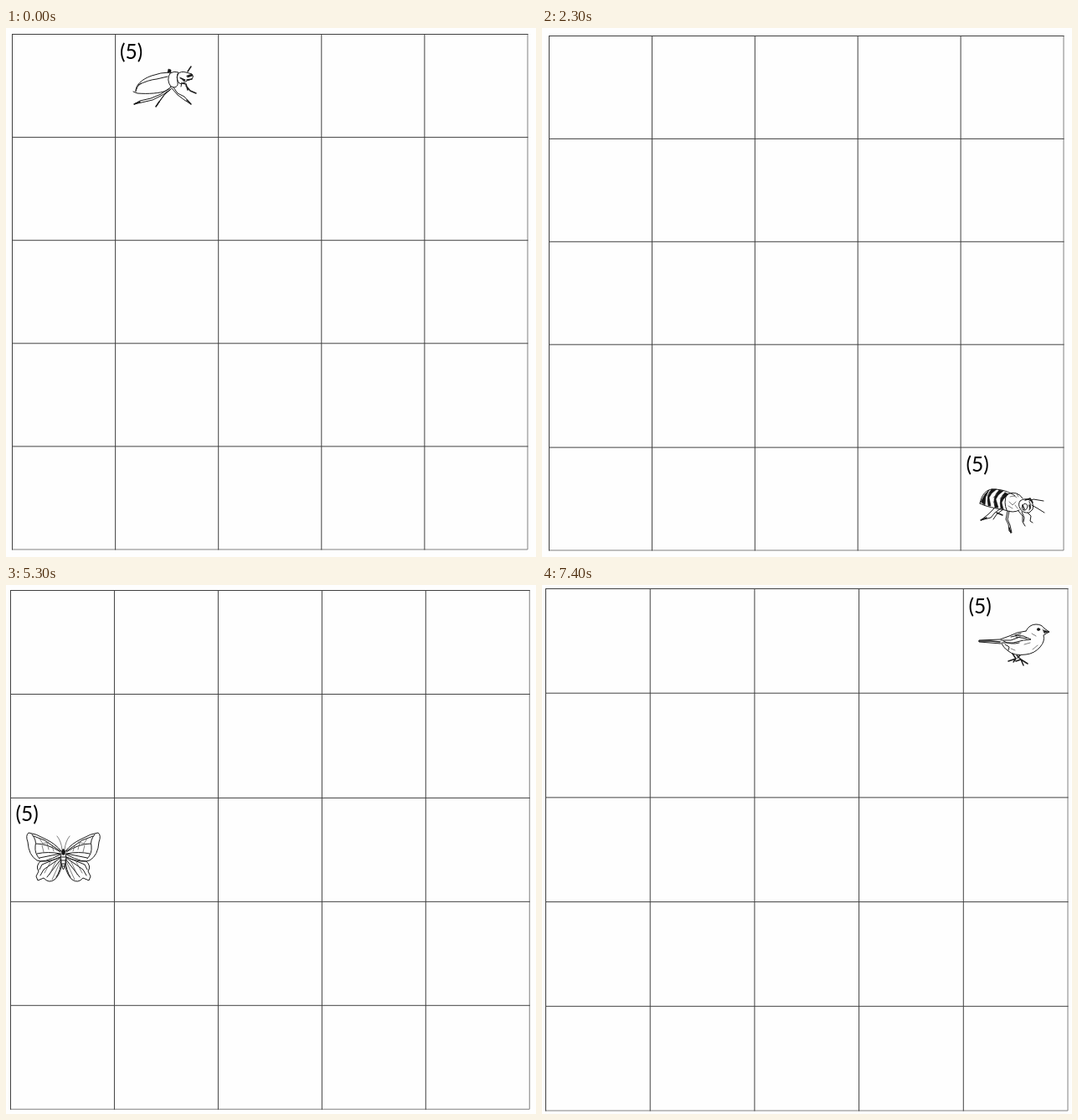
Write an HTML page that moves like this. It is 633 by 632 pixels and loops after 8 s.

```html
<!DOCTYPE html>
<html lang="en">
<head>
<meta charset="utf-8">
<title>Grid animals</title>
<style>
  html, body { margin: 0; width: 100%; height: 100%; overflow: hidden; background: #fefefe; }
  svg { display: block; width: 100vw; height: 100vh; }
  path, ellipse { fill: none; stroke: #1c1c1c; stroke-width: 1; stroke-linecap: round; stroke-linejoin: round; }
  text { font: 24.5px Lato, "Open Sans", sans-serif; fill: #000; }
  .grid { stroke: #404040; stroke-linecap: square; }
  .edge { stroke: #808080; stroke-linecap: square; }
  .thin { stroke: #555; stroke-width: .75; }
  .bold { stroke-width: 1.5; }
  .ink { fill: #151515; stroke-width: .6; }
  .scene { visibility: hidden; animation: 8s step-end infinite; }
  #beetle { animation-name: beetle; }
  #bee { animation-name: bee; }
  #butterfly { animation-name: butterfly; }
  #bird { animation-name: bird; }
  @keyframes beetle { 0% { visibility: visible } 6.25%, 100% { visibility: hidden } }
  @keyframes bee { 0% { visibility: hidden } 6.25% { visibility: visible } 43.75%, 100% { visibility: hidden } }
  @keyframes butterfly { 0% { visibility: hidden } 43.75% { visibility: visible } 81.25%, 100% { visibility: hidden } }
  @keyframes bird { 0% { visibility: hidden } 81.25%, 100% { visibility: visible } }
</style>
</head>
<body>
<svg viewBox="0 0 633 632" preserveAspectRatio="none">
  <g class="scene" id="beetle" data-grid="7.5 7.5 123.1">
    <text x="136" y="37">(5)</text>
    <path d="M155 76C154 69 162 61 174 57Q185 53 195 53M152 76L157 78C170 79 184 78 191 75Q196 73 197 70M158 68Q170 62 180 61L193 58M155 75Q156 70 161 66"/>
    <path d="M196 54Q201 51 206 53Q203 58 205 65Q206 70 201 71L197 70Q191 62 196 54M205 55Q209 51 215 53L222 55Q225 58 222 61L216 63Q211 68 207 66Q203 62 205 55M208 60L214 62"/>
    <path class="ink" d="M193 53L194 49L197 50L197 53ZM216 57L222 55L223 57L217 59ZM208 59L214 62L213 64Z"/>
    <path class="bold" d="M217 52L221 46M211 66L215 67L217 74M215 69L220 75L227 78M216 62L222 61"/>
    <path d="M195 72L185 79L173 84L160 87L153 91L162 89L175 86L187 80L197 73M197 73L189 80L184 87L179 94L185 85L192 76M200 71L205 78L213 82L221 91L213 86L205 80L198 72M210 65L209 70"/>
    <path class="bold" d="M153 91L160 88M179 94L183 88M216 86L221 91"/>
  </g>

  <g class="scene" id="bee" data-grid="8.5 9.5 122.9">
    <text x="506.5" y="530">(5)</text>
    <path d="M523 568C525 558 530 551 539 551C549 551 558 554 565 559M523 568C530 572 543 574 553 576Q563 580 570 576M555 557Q551 567 555 576M555 557Q568 552 574 562"/>
    <path class="ink" d="M524 566L529 557L534 552L530 560L529 570ZM537 551L543 551L537 556L534 561L536 571L533 571Q530 558 537 551ZM546 552L551 553L545 558L542 563L545 573L541 573Q537 560 546 552ZM553 555L557 557L551 563L549 567L551 575L548 574Q545 561 553 555Z"/>
    <path class="thin" d="M531 559L535 556M539 561L543 557M547 562L551 559M539 566L541 568M559 560Q564 558 567 561M558 566L562 570L566 566M557 571L562 574M565 570L568 574M567 557L569 560"/>
    <path d="M571 565Q576 561 583 564Q588 569 586 575L582 579Q574 580 571 574Q568 569 571 565M574 570Q578 566 580 571Q579 577 575 576Q572 574 574 570M582 566Q585 570 582 576"/>
    <path class="bold" d="M577 564L583 562L586 567M574 570L576 575M582 570L583 574"/>
    <path d="M582 565L587 563L599 565M585 570L592 574L600 579"/>
    <path d="M548 574L541 579L536 585L524 588L533 581L540 574M551 575L543 581L539 587M558 577L556 587L559 594L561 603L558 601L557 593L554 587L556 577M569 577L574 583L574 590L577 595M573 578L576 585L575 590M580 579L584 583L583 589L586 591"/>
    <path class="bold" d="M524 588L531 585M543 579L550 582M558 597L560 603"/>
  </g>

  <g class="scene" id="butterfly" data-grid="5.5 6.5 123.95">
    <text x="11.5" y="281.5">(5)</text>
    <g id="wing">
      <path d="M67 319Q58 308 46 303Q36 297 27 296Q23 299 26 307Q27 323 37 329Q44 333 65 322M65 325Q53 331 41 330Q35 336 39 342L36 348L38 353L45 350Q51 357 58 352Q64 347 67 334"/>
      <path d="M31 298Q37 305 35 312Q34 321 40 327M33 300L46 305L65 318M36 309Q50 309 65 319M37 321Q50 318 65 321M40 326L65 321"/>
      <path class="thin" d="M40 303L44 309L51 307M49 308L51 316M43 311L45 319M55 312L57 318"/>
      <path d="M65 325L43 334L40 340M65 326L45 340L41 347M66 327L49 349M66 329Q65 342 60 349"/>
      <path class="thin" d="M66 328L55 352M53 331L46 344M60 329L52 346"/>
      <path class="thin" d="M67 316Q66 306 61 300"/>
    </g>
    <use href="#wing" transform="matrix(-1 0 0 1 137 0)"/>
    <ellipse cx="68.5" cy="319" rx="2" ry="3.5" class="ink"/>
    <path d="M66 321L65 327L67 337L68.5 340L70 337L72 327L71 321M66 325H71M66 329H71M67 333H70M67 336H70"/>
  </g>

  <g class="scene" id="bird" data-grid="4.5 4.5 124.7">
    <text x="509.5" y="33.5">(5)</text>
    <path d="M578 55Q582 47 590 47Q597 47 600 52L606 56L602 58L599 60Q601 67 595 74Q588 82 578 83Q564 85 557 79Q551 75 549 70M578 55Q567 56 558 61L547 65L522 66L522 68L548 70M548 66L560 66L571 62M549 69L563 69L575 66"/>
    <path class="bold" d="M522 67L536 67L547 68"/>
    <path d="M560 62Q568 59 575 61L584 65L576 66M566 62L579 64M551 67Q560 72 570 69M553 71L558 74L557 78M565 60L572 58"/>
    <path class="thin" d="M560 76L565 78M586 77L592 72M598 53L601 59M585 58L590 61M576 71L583 69"/>
    <ellipse class="ink" cx="593" cy="53" rx="1.8" ry="1.5"/>
    <path class="ink" d="M599 54L606 56L600 57Z"/>
    <path class="bold" d="M562 82L566 88L557 91M566 88L563 92M567 84L572 89L575 96M572 89L580 94M572 89L566 91M571 84L568 87"/>
  </g>
</svg>
<script>
  function addPath(scene, cls, d) {
    const path = document.createElementNS("http://www.w3.org/2000/svg", "path");
    path.setAttribute("class", cls);
    path.setAttribute("d", d);
    scene.prepend(path);
  }

  for (const scene of document.querySelectorAll(".scene")) {
    const [left, top, step] = scene.dataset.grid.split(" ").map(Number);
    const right = left + 5 * step, bottom = top + 5 * step;
    let lines = "";
    for (let i = 0; i < 5; i++) {
      lines += `M${left} ${top + i * step}H${right}M${left + i * step} ${top}V${bottom}`;
    }
    addPath(scene, "grid", lines);
    addPath(scene, "edge", `M${right} ${top}V${bottom}H${left}`);
  }
</script>
</body>
</html>
```
